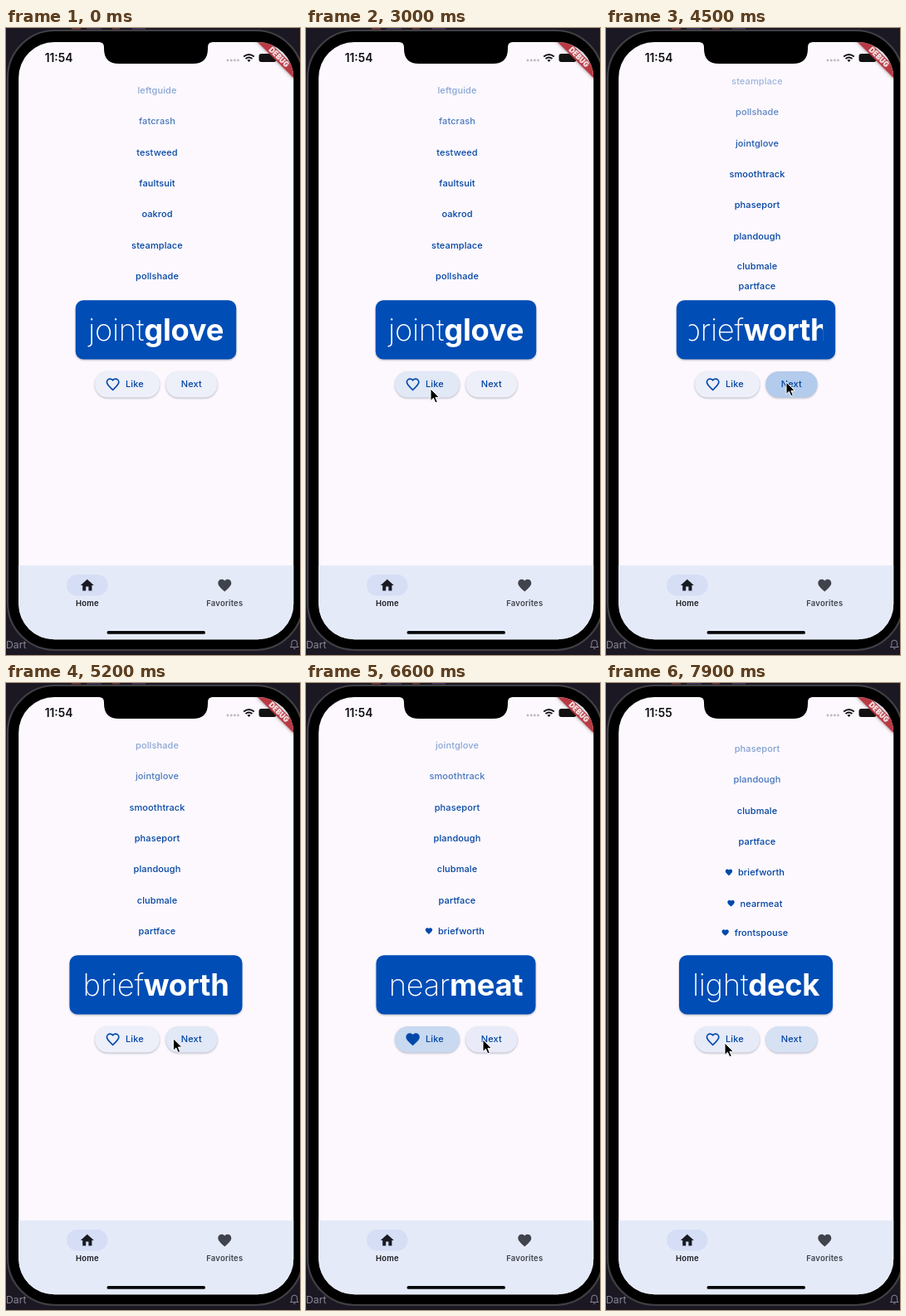
Animation, 354 px wide and 756 px high, one loop 8 s. Source, as an HTML page:

```html
<!DOCTYPE html>
<html lang="en">
<head>
<meta charset="utf-8">
<title>Word pairs</title>
<style>
  html, body { margin: 0; width: 100%; height: 100%; overflow: hidden; background: #1b1824; }
  svg { display: block; }
  text { font-family: Inter, Roboto, sans-serif; font-optical-sizing: none; }
  .label { font-size: 11px; font-weight: 500; letter-spacing: .1px; fill: #0043a0; }
  .title { font-size: 36.35px; letter-spacing: -.3px; fill: #fff; text-anchor: middle; }
  .thin { font-weight: 200; }
  .bold { font-weight: 700; }
  .tab { font-size: 9.5px; font-weight: 600; letter-spacing: .2px; text-anchor: middle; fill: #191b22; }
  .button { filter: drop-shadow(0 1px 1px rgba(30, 35, 60, .32)); }
</style>
</head>
<body>
<svg id="stage" width="100%" height="100%" viewBox="0 0 354 756">
  <defs>
    <clipPath id="screen"><rect x="15.2" y="17" width="331" height="720.3" rx="43"/></clipPath>
    <clipPath id="list"><rect x="15" y="47" width="332" height="271"/></clipPath>
    <clipPath id="likeClip"><rect x="107" y="414" width="78" height="31.5" rx="15.75"/></clipPath>
    <clipPath id="nextClip"><rect x="192.3" y="414" width="62.2" height="31.5" rx="15.75"/></clipPath>
    <path id="heart" d="M0 9.35l-1.45-1.32C-6.6 3.36-10 .28-10-3.5-10-6.58-7.58-9-4.5-9c1.74 0 3.41.81 4.5 2.09C1.09-8.19 2.76-9 4.5-9 7.58-9 10-6.58 10-3.5c0 3.78-3.4 6.86-8.55 11.54z"/>
  </defs>

  <!-- desktop and phone body -->
  <rect width="354" height="756" fill="#1b1824"/>
  <g opacity=".6">
    <rect x="79" width="11" height="1.5" fill="#b5503f"/>
    <rect x="97" width="18" height="1.5" fill="#5b4a78"/>
    <rect x="128" width="9" height="1.5" fill="#a1503f"/>
    <rect x="152" width="16" height="1.5" fill="#6a4d83"/>
  </g>
  <text x="0" y="747.5" font-size="12.2" fill="#898894">Dart</text>
  <path d="M342.5 746.5h9.5l-1.4-2v-3a3.4 3.4 0 0 0-6.8 0v3zM346 748.2h2.5" fill="none" stroke="#898894"/>
  <rect x="2" y="3" width="355.5" height="747" rx="57" fill="#000" stroke="#404044" stroke-width="2.2"/>

  <g clip-path="url(#screen)">
    <rect x="15" y="17" width="332" height="721" fill="#fcf8fe"/>
    <g id="rows" clip-path="url(#list)"></g>

    <rect id="card" y="328.2" height="71.4" rx="9.5" fill="#004db6" style="filter:drop-shadow(0 1px 1px rgba(0,0,0,.28))"/>
    <svg id="titleBox" y="329" height="71"><text class="title" y="48.2"><tspan id="first" class="thin"></tspan><tspan id="second" class="bold"></tspan></text></svg>

    <g id="like"></g>
    <g id="next"></g>
    <use id="mark" href="#heart"/>
    <text class="label" x="144" y="433.3">Like</text>
    <text class="label" x="210.8" y="433.3">Next</text>

    <!-- navigation bar -->
    <rect x="15" y="648" width="332" height="90" fill="#e4eaf8"/>
    <rect x="73" y="659" width="49.5" height="25.5" rx="12.75" fill="#d5def5"/>
    <path d="M-2 8V2h4v6h5V0h3L0-9-10 0h3v8z" transform="translate(97.8 672) scale(.8)" fill="#191b22"/>
    <use href="#heart" transform="translate(263.3 672) scale(.8)" fill="#40434b"/>
    <text class="tab" x="98" y="696.5">Home</text>
    <text class="tab" x="263.3" y="696.5" style="fill:#40434b">Favorites</text>
    <rect x="121.5" y="727" width="118.5" height="3.8" rx="1.9" fill="#08080a"/>

    <!-- status bar -->
    <path d="M112 16h137v1q-6 0-6 6v2q0 18-18 18h-89q-18 0-18-18v-2q0-6-6-6z" fill="#000"/>
    <text id="clock" x="46.7" y="41" font-size="13.8" font-weight="600" fill="#0c0c0e"></text>
    <g fill="#bab8be">
      <circle cx="267" cy="39" r="1.4"/><circle cx="271.3" cy="39" r="1.4"/>
      <circle cx="275.4" cy="39" r="1.4"/><circle cx="279.5" cy="39" r="1.4"/>
    </g>
    <g fill="none" stroke="#111" stroke-width="1.9">
      <path d="M286.2 34.6q6.3-5 12.6 0M288.5 37q4-3 8 0"/>
      <path d="M291 38.8h3l-1.5 1.6z" fill="#111" stroke-width="1"/>
    </g>
    <rect x="304.5" y="31" width="21" height="10" rx="3" fill="#111"/>
    <g transform="translate(347 17) rotate(45)" style="filter:drop-shadow(0 0 2px rgba(0,0,0,.4))">
      <rect x="-42" y="21" width="84" height="10.2" fill="#b83a43"/>
      <text y="29.1" font-size="8.3" font-weight="900" letter-spacing=".2" text-anchor="middle" fill="#fff">DEBUG</text>
    </g>
  </g>

  <path id="cursor" d="M0 0V14.5L3.4 11.3 5.8 16.8 8.3 15.8 5.9 10.4H10.4Z" fill="#000" stroke="#fff" stroke-width="1" stroke-linejoin="round"/>
</svg>

<script>
const LOOP = 8000;
const ROW = 37.3, LIST_END = 317.6, MID = 180.5;
const FIRST = 7; // word on the card when the loop starts
const INK = '#0f62c2', BLUE = '#0049ab';

const words = ['left|guide', 'fat|crash', 'test|weed', 'fault|suit', 'oak|rod', 'steam|place',
  'poll|shade', 'joint|glove', 'smooth|track', 'phase|port', 'plan|dough', 'club|male',
  'part|face', 'brief|worth', 'near|meat', 'front|spouse', 'light|deck'].map(w => w.split('|'));
const cardWidths = [193.5, 251, 206, 209.5, 190, 172, 208, 192, 233, 185];

const nextTaps = [3420, 3615, 3810, 4015, 4220, 4394, 5950, 6700, 7633];
const likeTaps = [5400, 6440, 7150];
const likedAt = { 13: likeTaps[0], 14: likeTaps[1], 15: likeTaps[2] };

// time, x, y of the pointer tip
const path = [
  [1000, -12, 690], [1700, 140, 455], [1900, 140, 455], [2200, 144, 448], [2700, 144, 448],
  [2950, 150, 435], [3050, 150, 435], [3250, 217, 427], [5150, 217, 427], [5310, 152, 434],
  [5480, 152, 434], [5760, 208, 428], [5980, 208, 428], [6250, 150, 435], [6450, 150, 435],
  [6585, 213, 430], [6730, 213, 430], [7000, 148, 434], [7200, 148, 434], [7450, 216, 429],
  [7700, 216, 429], [7890, 143, 434]
];

const $ = id => document.getElementById(id);
const clamp = v => Math.max(0, Math.min(1, v));
const mix = (a, b, p) => a + (b - a) * p;

function set(el, attrs) {
  for (const k in attrs) el.setAttribute(k, attrs[k]);
  return el;
}

function add(parent, tag, attrs) {
  return parent.appendChild(set(document.createElementNS('http://www.w3.org/2000/svg', tag), attrs));
}

function pointer(t) {
  const i = path.findIndex(k => k[0] > t);
  if (i === 0) return path[0].slice(1);
  if (i < 0) return path[path.length - 1].slice(1);
  const [a, b] = [path[i - 1], path[i]];
  const p = (t - a[0]) / (b[0] - a[0]);
  const e = p * p * (3 - 2 * p);
  return [mix(a[1], b[1], e), mix(a[2], b[2], e)];
}

function makeButton(id, x, width, taps) {
  const box = { x, y: 414, width, height: 31.5, rx: 15.75 };
  const group = $(id);
  add(group, 'rect', { ...box, class: 'button', fill: '#edeff9' });
  const hover = add(group, 'rect', { ...box, fill: INK });
  const ink = add(group, 'g', { 'clip-path': `url(#${id}Clip)` });
  const ripples = taps.map(up => {
    const down = up - (up === 5950 ? 100 : 70);
    const [cx, cy] = pointer(down);
    return { up, down, el: add(ink, 'circle', { cx, cy: cy + 2, fill: INK }) };
  });
  const isOver = t => {
    const [px, py] = pointer(t);
    return px > x && px < x + width && py > 414 && py < 445.5;
  };
  // the hover tint follows the pointer with a short fade
  const lags = [0, 40, 80, 120, 160, 200];
  return t => {
    set(hover, { opacity: .05 * lags.filter(lag => isOver(t - lag)).length / lags.length });
    for (const { up, down, el } of ripples) {
      const alpha = .2 * clamp((t - down) / 60) * clamp(1 - (t - up) / 450);
      set(el, { r: 3 + 47 * clamp((t - down) / 225), opacity: alpha });
    }
  };
}

const buttons = [
  makeButton('like', 107, 78, likeTaps),
  makeButton('next', 192.3, 62.2, nextTaps)
];

const rows = words.slice(0, -1).map(pair => {
  const box = add($('rows'), 'svg', { x: 0, width: 354, height: ROW });
  const text = add(box, 'text', { class: 'label', 'text-anchor': 'middle' });
  text.textContent = pair.join('');
  const heart = add(box, 'use', { href: '#heart', fill: BLUE });
  return { box, text, heart, half: text.getComputedTextLength() / 2 };
});

function drawRows(t, current) {
  let bottom = LIST_END;
  for (let i = rows.length - 1; i >= 0; i--) {
    const { box, text, heart, half } = rows[i];
    const grown = i < FIRST ? 1 : clamp((t - nextTaps[i - FIRST]) / 300);
    const h = ROW * grown, y = bottom - h / 2;
    bottom -= h;
    const shown = i < current && h > 0 && y > 20;
    set(box, { display: shown ? 'inline' : 'none' });
    if (!shown) continue;
    const liked = likedAt[i] <= t;
    const x = liked ? 187 : 182;
    set(box, { y: y - h / 2, height: h, opacity: clamp((y - 10) / 145) });
    set(text, { x, y: h / 2 + 4 });
    set(heart, {
      display: liked ? 'inline' : 'none',
      transform: `translate(${x - half - 11} ${h / 2}) scale(.42)`
    });
  }
}

function drawCard(t, current) {
  const n = current - FIRST;
  const p = n ? clamp((t - nextTaps[n - 1]) / 200) : 1;
  const w = n ? mix(cardWidths[n - 1], cardWidths[n], p) : cardWidths[0];
  set($('card'), { x: MID - w / 2, width: w });
  const inner = w - 30;
  set($('titleBox'), { x: MID - inner / 2, width: inner, overflow: p < 1 ? 'hidden' : 'visible' });
  set($('titleBox').firstElementChild, { x: inner / 2 });
  $('first').textContent = words[current][0];
  $('second').textContent = words[current][1];
}

function drawMark(filled) {
  set($('mark'), {
    transform: `translate(128.6 429.6) scale(${filled ? .82 : .72})`,
    fill: filled ? BLUE : 'none',
    stroke: filled ? 'none' : BLUE,
    'stroke-width': 2.3
  });
}

function draw(t) {
  const current = FIRST + nextTaps.filter(c => c <= t).length;
  const [x, y] = pointer(t);
  drawRows(t, current);
  drawCard(t, current);
  drawMark(likedAt[current] <= t);
  buttons.forEach(update => update(t));
  $('clock').textContent = t < 6800 ? '11:54' : '11:55';
  set($('cursor'), {
    transform: `translate(${x} ${y})`,
    display: t < path[0][0] ? 'none' : 'inline'
  });
}

const start = performance.now();
function tick() {
  draw((performance.now() - start) % LOOP);
  requestAnimationFrame(tick);
}
tick();
</script>
</body>
</html>
```
